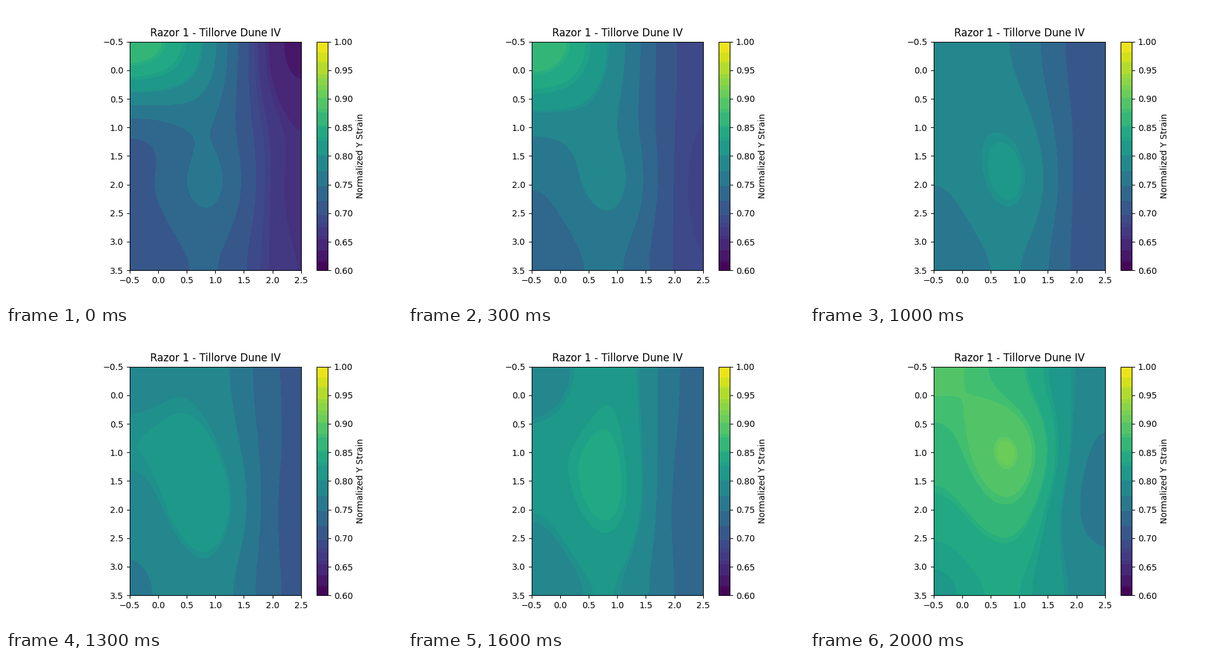
A matplotlib script that plays this animation: 640 by 480 pixels, repeating every 2.1 s.

```python
import numpy as np
import matplotlib.pyplot as plt
from matplotlib.animation import FuncAnimation
from matplotlib.colors import ListedColormap

FRAMES, INTERVAL = 21, 100

# Key points of the overall level and of two cells on the top edge.
TIMES = (0, 3, 7, 10, 15, 18, 20)
LEVEL = (.717, .745, .757, .770, .794, .814, .840)
CORNER = (.876, .876, .845, .789, .799, .738, .887)
FRONT = (.792, .792, .770, .776, .818, .921, .864)


def banded(name):
    """Merge colours that share a coarse RGB cell into their mean."""
    rgb = plt.get_cmap(name)(np.arange(256), bytes=True)[:, :3].astype(int)
    r, g, b = rgb.T
    key = (r // 32) * 256 + (g // 16) * 16 + b // 32
    _, group = np.unique(key, return_inverse=True)
    count = np.bincount(group)
    means = [np.bincount(group, weights=c) / count for c in rgb.T]
    return ListedColormap(np.column_stack(means)[group] / 255)


def strain(step):
    """4 x 3 cells: a rising level whose ridge climbs late in the loop."""
    level, corner, front = (np.interp(step, TIMES, path)
                            for path in (LEVEL, CORNER, FRONT))
    climb = np.clip((step - 12) / 8, 0, 1) ** 2
    dip = 0.04 * max(0, 1 - step / 3)
    right = 0.7 + 0.8 * (level - 0.77)
    ends = right + 0.03 * climb
    return np.array([
        [corner, front, ends - dip],
        [level + 0.023 - dip, level + 0.04 + 0.095 * climb, right],
        [level, level + 0.09 - 0.03 * climb, right - 0.013],
        [level - 0.017, level + 0.025 - 0.02 * climb, ends],
    ])


fig, ax = plt.subplots(figsize=(6.4, 4.8), dpi=100)
image = ax.imshow(strain(0), cmap=banded("viridis"), vmin=0.6, vmax=1.0,
                  interpolation="bicubic")
ax.set_title("Razor 1 - Tillorve Dune IV")
fig.colorbar(image, label="Normalized Y Strain")


def update(step):
    image.set_data(strain(step))
    return [image]


anim = FuncAnimation(fig, update, frames=FRAMES, interval=INTERVAL,
                     repeat=True, repeat_delay=0)
plt.show()
```
